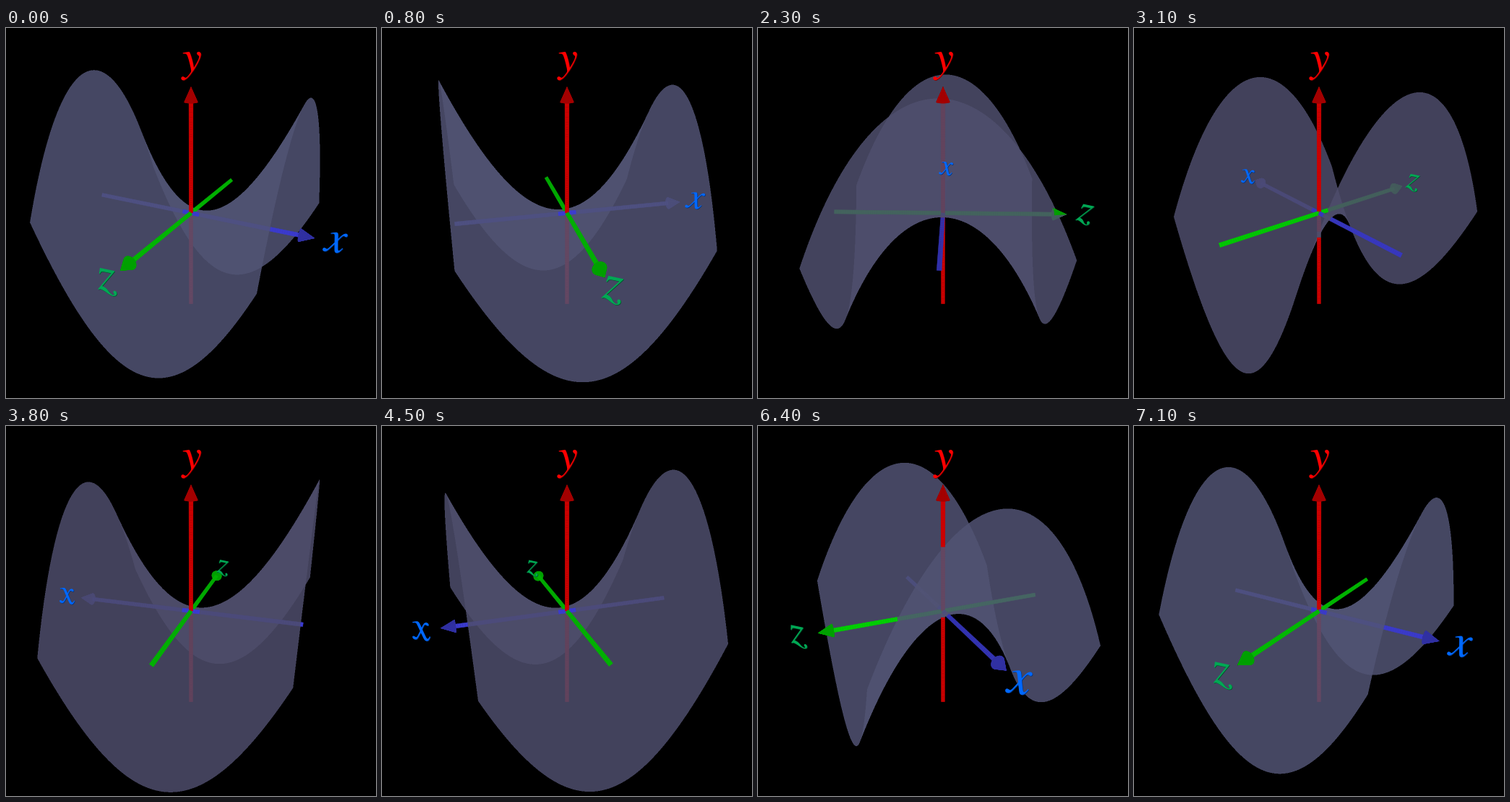
Animation, 512 px wide and 512 px high, one loop 7.2 s. Source, as a matplotlib script:

```python
import numpy as np
import matplotlib.pyplot as plt
from matplotlib.animation import FuncAnimation
from matplotlib.collections import PolyCollection
from matplotlib.patches import PathPatch
from matplotlib.path import Path
from matplotlib.textpath import TextPath

plt.rcParams["mathtext.fontset"] = "stix"

SIZE, FRAMES, STEP_MS = 512, 72, 100
FOCAL = SIZE / 2 / np.tan(np.radians(22.5))
CAM_Y, CAM_W = 2.0, np.sqrt(20)          # camera height and ground distance
DIST = np.hypot(CAM_Y, CAM_W)
SIN, COS = CAM_Y / DIST, CAM_W / DIST
START = np.arctan2(1, 2)

LOW, HIGH = -1.2, 1.15                   # domain of y = x^2 - z^2
THROUGH = 0.15                           # light passing one layer
SHAFT_R, CONE_R, REACH, TIP = 0.021, 0.066, 1.2, 1.342
LABEL_AT, EM = 1.54, 0.42

SHAFT = {"x": (60, 60, 210), "y": (211, 0, 0), "z": (0, 211, 0)}
CONE = {"x": (48, 48, 162), "y": (164, 0, 0), "z": (0, 160, 0)}
INK = {"x": (0, 104, 255), "y": (255, 0, 0), "z": (0, 168, 84)}
TILT = {"x": 8, "y": 0, "z": 12}


def rgb(color):
    return np.array(color) / 255


def project(p):
    """World points (right, up, toward viewer) to pixels and depth."""
    u, y, w = np.moveaxis(np.asarray(p, float), -1, 0)
    depth = DIST - COS * w - SIN * y
    scale = FOCAL / depth
    xy = np.stack([SIZE / 2 + u * scale,
                   SIZE / 2 + (SIN * w - COS * y) * scale], -1)
    return xy, depth


def ray_hits(vu, vy, vw, a):
    """Ray parameters where camera rays meet the saddle, with validity masks."""
    c, s = np.float32(np.cos(2 * a)), np.float32(np.sin(2 * a))
    ca, sa = np.float32(np.cos(a)), np.float32(np.sin(a))
    cw = np.float32(CAM_W)
    qa = c * (vu * vu - vw * vw) + 2 * s * (vu * vw)
    qb = 2 * cw * (s * vu - c * vw) - vy
    qc = np.float32(-c * CAM_W ** 2 - CAM_Y)
    disc = qb * qb - 4 * qa * qc
    real = disc >= 0
    q = -0.5 * (qb + np.copysign(np.sqrt(np.maximum(disc, 0)), qb))
    hits = []
    for t in (q / qa, qc / q):
        u, w = t * vu, cw + t * vw
        x, z = u * ca + w * sa, w * ca - u * sa
        ok = real & (t > 0) & (x > LOW) & (x < HIGH) & (z > LOW) & (z < HIGH)
        hits.append((t, ok))
    return hits


# two samples per pixel in each direction
grid = ((np.arange(2 * SIZE) + 0.5) / 2 - SIZE / 2) / FOCAL
gx, gy = np.meshgrid(grid, grid)
RAYS = [r.astype(np.float32) for r in (gx, -SIN - COS * gy, SIN * gy - COS)]


def surface_cover(a):
    (_, one), (_, two) = ray_hits(*RAYS, a)
    cover = np.array([0, 1 - THROUGH, 1 - THROUGH ** 2], np.float32)
    full = cover[one.astype(np.int8) + two]
    return (full[::2, ::2] + full[1::2, ::2]
            + full[::2, 1::2] + full[1::2, 1::2]) / 4


def layers_before(points, a):
    v = points - np.array([0, CAM_Y, CAM_W])
    return sum((ok & (t < 0.9995)).astype(int)
               for t, ok in ray_hits(*v.T, a))


def axis_dirs(a):
    c, s = np.cos(a), np.sin(a)
    return {"x": np.array([c, 0, s]), "y": np.array([0, 1, 0]),
            "z": np.array([-s, 0, c])}


def shaft_parts(d):
    cuts = np.linspace(-REACH, REACH, 97)
    pts = cuts[:, None] * d
    xy, depth = project(pts)
    along = xy[-1] - xy[0]
    side = np.array([-along[1], along[0]]) / np.hypot(*along)
    off = side * (SHAFT_R * FOCAL / depth)[:, None]
    left, right = xy + off, xy - off
    quads = [np.array([left[i], left[i + 1], right[i + 1], right[i]])
             for i in range(len(cuts) - 1)]
    return quads, (pts[:-1] + pts[1:]) / 2


def cone_parts(d):
    e1 = np.cross(d, [0, 1, 0]) if abs(d[1]) < 0.5 else np.array([1.0, 0, 0])
    e2 = np.cross(d, e1)
    t = np.linspace(0, 2 * np.pi, 25)[:, None]
    rim = REACH * d + CONE_R * (np.cos(t) * e1 + np.sin(t) * e2)
    tip = TIP * d
    shapes = [rim] + [np.array([tip, rim[i], rim[i + 1]]) for i in range(24)]
    return [project(s)[0] for s in shapes], np.array([s.mean(0) for s in shapes])


def shaft_light(d):
    """Shafts seen end-on look darker."""
    facing = d @ np.array([0, SIN, COS])
    return 0.7 + 0.3 * np.sqrt(1 - facing ** 2)


def axes_shapes(a, tint):
    polys, mids, colors = [], [], []
    for name, d in axis_dirs(a).items():
        for parts, color in ((shaft_parts, rgb(SHAFT[name]) * shaft_light(d)),
                             (cone_parts, rgb(CONE[name]))):
            shapes, centers = parts(d)
            polys += shapes
            mids.append(centers)
            colors += [color] * len(shapes)
    mids, colors = np.concatenate(mids), np.array(colors)
    to_cam = np.array([0, CAM_Y, CAM_W]) - mids
    near = mids + SHAFT_R * to_cam / np.linalg.norm(to_cam, axis=1)[:, None]
    clear = (THROUGH ** layers_before(near, a))[:, None]
    colors = colors * clear + tint * (1 - clear)
    order = np.argsort(-project(mids)[1])
    return [polys[i] for i in order], np.clip(colors[order], 0, 1)


def glyph(ch):
    path = TextPath((0, 0), f"${ch}$", size=100)
    box = path.get_extents()
    middle = np.array([box.x0 + box.x1, box.y0 + box.y1]) / 2
    return (path.vertices - middle) / 100, path.codes


GLYPHS = {ch: glyph(ch) for ch in "xyz"}


def label_path(name, d, shift=0):
    v, codes = GLYPHS[name]
    center, depth = project(LABEL_AT * d)
    # letters lean outward toward the sides of the view
    lean = np.tan(np.radians(0.07 * (center[0] - SIZE / 2)))
    x = v[:, 0] + v[:, 1] * lean
    y = -v[:, 1] + v[:, 0] * np.tan(np.radians(TILT[name]))
    return Path(center + shift + np.stack([x, y], -1) * EM * FOCAL / depth,
                codes)


fig = plt.figure(figsize=(SIZE / 100, SIZE / 100), dpi=100, facecolor="black")
ax = fig.add_axes([0, 0, 1, 1])
ax.set_facecolor("black")
image = ax.imshow(np.zeros((SIZE, SIZE, 3)), extent=(0, SIZE, SIZE, 0),
                  interpolation="nearest", aspect="auto")
ax.set_xlim(0, SIZE)
ax.set_ylim(SIZE, 0)
ax.axis("off")
axes_art = PolyCollection([], linewidths=0.3, zorder=3)
ax.add_collection(axes_art)

labels = []
for ch in "xyz":
    for shift, shade, layer in ((0.7, 0.5, 4), (0, 1, 5)):
        patch = PathPatch(Path([(0, 0)]), lw=0, zorder=layer,
                          fc=rgb(INK[ch]) * shade)
        ax.add_patch(patch)
        labels.append((ch, shift, patch))


def update(n):
    turn = 2 * np.pi * n / FRAMES
    a = START - turn
    seen = rgb([68, 68.5, 95]) + rgb([1.5, 3, 4]) * np.cos(turn)
    tint = seen / (1 - THROUGH)
    with np.errstate(divide="ignore", invalid="ignore", over="ignore"):
        image.set_data(surface_cover(a)[..., None] * tint.astype(np.float32))
        polys, colors = axes_shapes(a, tint)
    axes_art.set_verts(polys)
    axes_art.set_facecolor(colors)
    axes_art.set_edgecolor(colors)
    dirs = axis_dirs(a)
    for name, shift, patch in labels:
        patch.set_path(label_path(name, dirs[name], shift))
    return [image, axes_art] + [p for _, _, p in labels]


anim = FuncAnimation(fig, update, frames=FRAMES, interval=STEP_MS,
                     repeat=True, repeat_delay=0, blit=False)
plt.show()
```
